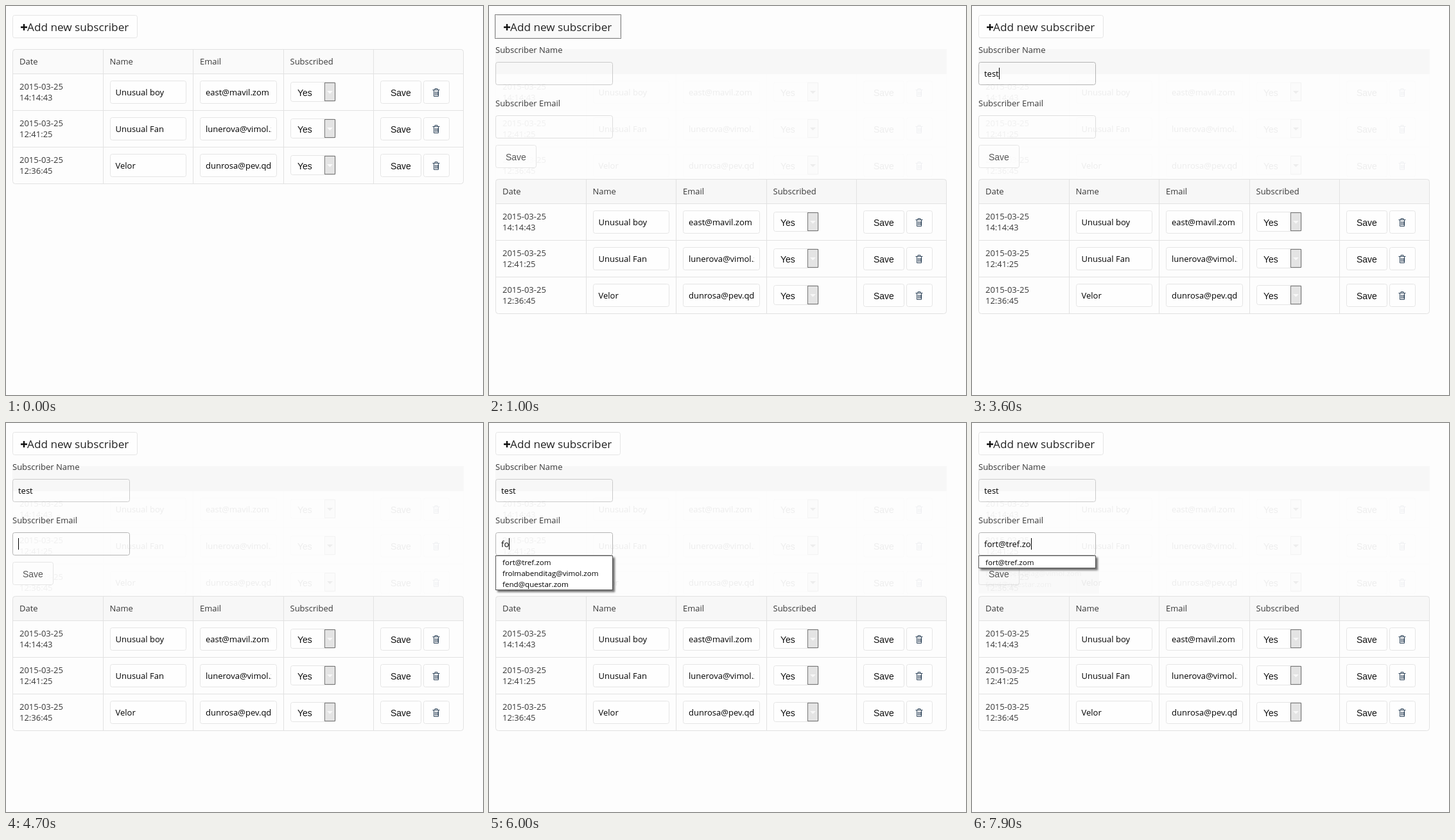
An HTML page for the animation above (8000 ms loop, 743x605 px).

```html
<!DOCTYPE html>
<html lang="en">
<head>
<meta charset="utf-8">
<title>Subscriber list</title>
<style>
  html, body { margin: 0; width: 100%; height: 100%; overflow: hidden; background: #fdfdfd; }
  svg { display: block; }
  text { font: 13px "Open Sans", sans-serif; fill: #383838; white-space: pre; }
  .value { fill: #000; }
  .control { font: 14px "Liberation Sans", Arial, sans-serif; fill: #111; }
  .title { font-size: 17.2px; fill: #222; }
  .option { font-size: 11.6px; fill: #000; }
  .box { fill: #fefefe; stroke: #e5e5e5; }
  .field { fill: none; stroke: #dedede; }
  .field.named { stroke: #cbcbcb; }
  .field.focus { stroke: #b4b4b4; }
  .line { fill: none; stroke: #e2e2e2; }
  .icon { fill: none; stroke: #34495e; }
  #popupBox { fill: #fff; stroke: #555; filter: drop-shadow(3px 3px 1.5px rgba(0, 0, 0, .55)); }
</style>
</head>
<body>
<svg id="stage" width="743" height="605" viewBox="0 0 743 605"></svg>
<script>
const LOOP = 8000, ROW = 57, FORM_HEIGHT = 202;
const NAME = 'test ', EMAIL = 'fort@tref.zom';
const nameKeys = [2800, 3100, 3400, 3600, 4000];
const emailKeys = [5800, 6000, 6200, 6400, 6700, 7000, 7100, 7300, 7500, 7700, 7800, 7900];
const caretToggles = [1600, 2100, 2500, 4400, 4700, 5200, 5700];
const options = [EMAIL, 'frolmabenditag@vimol.zom', 'fend@questar.zom'];
const people = [
  ['14:14:43', 'Unusual boy', 'east@mavil.zom'],
  ['12:41:25', 'Unusual Fan', 'lunerova@vimol.zom'],
  ['12:36:45', 'Velor', 'dunrosa@pev.qd'],
];

const text = (x, y, str, cls = '', id = '') => `<text id="${id}" class="${cls}" x="${x}" y="${y}">${str}</text>`;
const box = (x, y, w, h, cls = 'box', id = '') =>
  `<rect id="${id}" class="${cls}" x="${x + .5}" y="${y + .5}" width="${w - 1}" height="${h - 1}" rx="3"/>`;
const path = (d, cls) => `<path class="${cls}" d="${d}"/>`;
const saveButton = (x, y) => box(x, y, 64, 36) + text(x + 16, y + 24, 'Save', 'control');

function personRow([time, name, email], i) {
  const y = 106 + i * ROW;
  return text(21, y + 24, '2015-03-25') + text(21, y + 41, time)
    + box(162, y + 10, 119, 36) + text(170.5, y + 33, name, 'value')
    + box(302, y + 10, 120, 36)
    + `<svg x="311" y="${y + 11}" width="102" height="34">${text(0, 22, email, 'value')}</svg>`
    + box(443, y + 12, 71, 31) + text(454, y + 34, 'Yes', 'control')
    + `<rect x="496.5" y="${y + 13.5}" width="16" height="28" fill="#e4e4e4" stroke="#777"/>`
    + `<path d="M500 ${y + 26}h9l-4.5 4.5z"/>`
    + saveButton(583, y + 10) + box(650, y + 10, 41, 36)
    + path(`M664.5 ${y + 24.5}h11M668 ${y + 24}v-1.5h4v1.5M666.5 ${y + 25}v9.5h7v-9.5M668.5 ${y + 27}v6M670.5 ${y + 27}v6M672.5 ${y + 27}v6`, 'icon');
}

const table = `<g id="table">
  <rect x="10" y="67" width="703" height="210" rx="4" fill="#fdfdfd"/>
  <path d="M10 106V71q0-4 4-4h695q4 0 4 4v35z"/>
  ${['Date', 'Name', 'Email', 'Subscribed'].map((s, i) => text([21, 161.5, 302, 442.5][i], 91, s)).join('')}
  ${people.map(personRow).join('')}
  ${path('M10 105.5h703M10 162.5h703M10 219.5h703M151.5 67v210M291.5 67v210M432.5 67v210M572.5 67v210', 'line')}
  <rect class="line" x="10.5" y="67.5" width="702" height="209" rx="4"/>
</g>`;

const optionRows = from => options.slice(from).map((s, i) => text(21, 221 + 17 * (i + from), s, 'option')).join('');

stage.innerHTML = `
  <g id="form">
    <use href="#table" opacity=".06"/>
    <path d="M10 67h703v39H10z" fill="#f7f7f7"/>
    ${text(10, 73, 'Subscriber Name')}${box(10, 87, 183, 36, 'field named', 'nameBox')}
    ${text(10, 156, 'Subscriber Email')}${box(10, 170, 183, 36, 'field', 'emailBox')}
    <g fill-opacity=".7">${saveButton(10, 216)}</g>
    ${text(19, 110, '', 'value', 'nameText')}${text(19, 193, '', 'value', 'emailText')}
    <g id="popupGhost" opacity=".05"><path d="M10 226h188v39H10z" opacity=".3"/>${optionRows(1)}</g>
    <g id="popup">
      <rect id="popupBox" x="10.5" y="206.5" width="182"/>
      ${optionRows(0)}
    </g>
    <rect id="caret" width="1" height="18"/>
  </g>
  ${box(10, 14, 195, 36, 'box', 'addButton')}
  <g id="pressed" fill="none" stroke="#000">
    <rect x="11.5" y="15.5" width="192" height="33" stroke-width="2" opacity=".05"/>
    <rect x="12.5" y="16.5" width="190" height="31" stroke-width="4" opacity=".03"/>
  </g>
  <rect id="focusRing" x="9.5" y="13.5" width="196" height="37" fill="none" stroke="#000" stroke-dasharray="1 1"/>
  <path d="M23 33h10M28 28v10" stroke="#111" stroke-width="2.4"/>
  ${text(33, 39, 'Add new subscriber', 'title')}
  <g id="place">${table}</g>`;

const el = id => document.getElementById(id);
const show = (id, on) => { el(id).style.display = on ? '' : 'none'; };
const passed = (times, t) => times.filter(time => t >= time).length;

function draw(t) {
  const open = t >= 1000, inEmail = t >= 4700;
  const pressed = t >= 900 && t < 1000;
  const ring = t >= 900 && t < 1600;
  show('form', open);
  show('pressed', pressed);
  show('focusRing', ring);
  el('addButton').style.fill = ring ? '#f9f9f9' : '';
  el('place').setAttribute('transform', `translate(0 ${open ? FORM_HEIGHT : 0})`);
  el('place').setAttribute('fill', open ? '#f7f7f7' : '#fafafa');

  el('nameText').textContent = NAME.slice(0, passed(nameKeys, t));
  el('emailText').textContent = EMAIL.slice(0, passed(emailKeys, t));
  el('nameBox').classList.toggle('focus', t >= 1600 && !inEmail);
  el('emailBox').classList.toggle('focus', inEmail);

  const rows = t >= 6100 ? 1 : t >= 5900 ? 3 : 0;
  show('popup', rows);
  show('popupGhost', rows === 1);
  el('popupBox').setAttribute('height', 2 + 17 * rows);
  el('popup').querySelectorAll('text').forEach((row, i) => { row.style.display = i < rows ? '' : 'none'; });

  const caretOn = passed(caretToggles, t) % 2;
  show('caret', caretOn);
  if (caretOn) {
    const width = el(inEmail ? 'emailText' : 'nameText').getComputedTextLength();
    el('caret').setAttribute('x', 19 + Math.round(width));
    el('caret').setAttribute('y', inEmail ? 179 : 96);
  }
}

const start = performance.now();
function tick() {
  draw((performance.now() - start) % LOOP);
  requestAnimationFrame(tick);
}
tick();
</script>
</body>
</html>
```
